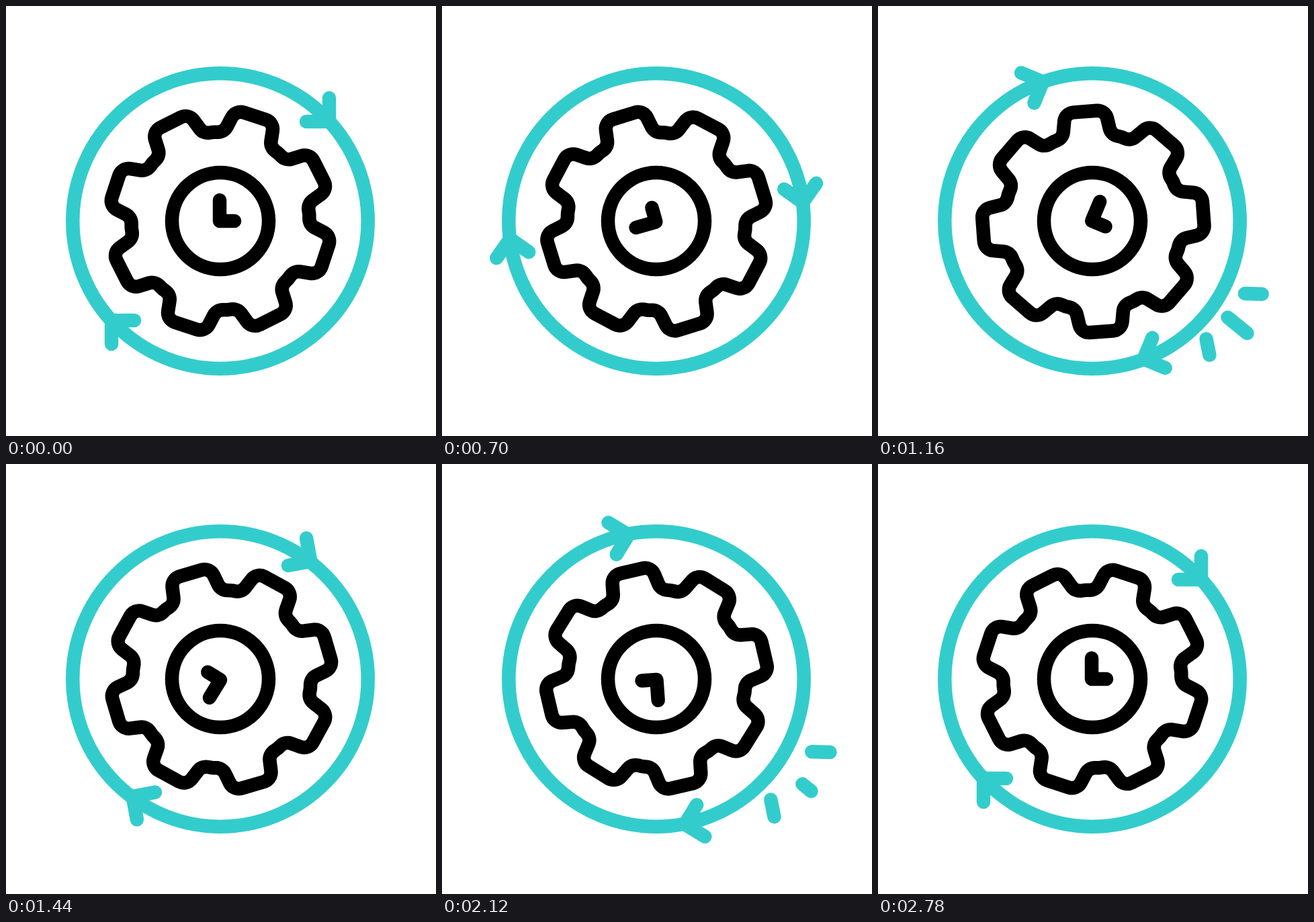
These frames come from a looping animation (640x640 px, 3260 ms). An HTML page with a canvas:

```html
<!DOCTYPE html>
<html>
<head>
<meta charset="utf-8">
<style>
  html, body { margin: 0; width: 100%; height: 100%; overflow: hidden; background: #fff; }
  canvas { display: block; }
</style>
</head>
<body>
<canvas id="stage" width="640" height="640"></canvas>
<script>
const ctx = document.getElementById('stage').getContext('2d');
const TEAL = '#33cccc', BLACK = '#000';
const LOOP = 3260, STEP = 20, START = 200, SPIN = 2580;
const TEETH = 8, GEAR_PHASE = 18.2;
const BURSTS = [996, 1875], TRIM = 160;

// Sparks: x1, y1, x2, y2, delay in ms
const SPARKS = [
  [520.5, 463.5, 549.5, 487, 0],
  [546, 428, 577.5, 429, 48],
  [488.5, 495.5, 494.5, 525, 48]
];

const ease = x => {
  x = Math.min(1, Math.max(0, x));
  return x * x * (3 - 2 * x);
};
const mix = (a, b, k) => a + (b - a) * k;

function stroke(color, path) {
  ctx.beginPath();
  path();
  ctx.strokeStyle = color;
  ctx.stroke();
}

function polyline(color, ...points) {
  stroke(color, () => points.forEach(([x, y]) => ctx.lineTo(x, y)));
}

function circle(color, r) {
  stroke(color, () => ctx.arc(319, 320, r, 0, 2 * Math.PI));
}

// Draws in stage coordinates, turned about a pivot
function rotated(degrees, x, y, draw) {
  ctx.save();
  ctx.translate(x, y);
  ctx.rotate(degrees * Math.PI / 180);
  ctx.translate(-x, -y);
  draw();
  ctx.restore();
}

// Outline corners of all teeth and valleys, rounded while tracing
const TOOTH = [[-36, -127.5], [-30, -164.3], [30, -164.3], [36, -127.5], [50.8, -122.6]];
const gearPoints = [];
for (let i = 0; i < TEETH; i++) {
  const a = (i * 360 / TEETH + GEAR_PHASE) * Math.PI / 180;
  const c = Math.cos(a), s = Math.sin(a);
  for (const [x, y] of TOOTH) gearPoints.push([319 + x * c - y * s, 320 + x * s + y * c]);
}

function gear() {
  stroke(BLACK, () => {
    const n = gearPoints.length;
    const [a, b] = [gearPoints[n - 1], gearPoints[0]];
    ctx.moveTo(mix(a[0], b[0], 0.3), mix(a[1], b[1], 0.3));
    gearPoints.forEach((p, i) => ctx.arcTo(...p, ...gearPoints[(i + 1) % n], 15));
    ctx.closePath();
  });
}

function arrows() {
  for (const side of [1, -1]) {
    polyline(TEAL, ...[[162, -183], [162, -148], [128, -148]]
      .map(([x, y]) => [319 + side * x, 320 + side * y]));
  }
}

function hands() {
  polyline(BLACK, [318, 289], [318, 320], [340, 320]);
}

function spark([x1, y1, x2, y2, delay], age) {
  const head = ease((age - delay) / TRIM);
  const tail = ease((age - delay - TRIM) / TRIM);
  if (head <= tail) return;
  polyline(TEAL,
    [mix(x1, x2, tail), mix(y1, y2, tail)],
    [mix(x1, x2, head), mix(y1, y2, head)]);
}

function render(time) {
  const t = Math.floor(time % LOOP / STEP) * STEP;
  const turn = 360 * ease((t - START) / SPIN);

  ctx.clearRect(0, 0, 640, 640);
  ctx.lineWidth = 20.5;
  ctx.lineCap = ctx.lineJoin = 'round';

  circle(TEAL, 219.7);
  rotated(turn, 320, 320, arrows);
  rotated(-turn, 320, 320, gear);
  circle(BLACK, 72);
  rotated(-3 * turn, 318.7, 320.5, hands);
  for (const start of BURSTS) SPARKS.forEach(s => spark(s, t - start));
}

const begin = performance.now();
function frame() {
  render(performance.now() - begin);
  requestAnimationFrame(frame);
}
frame();
</script>
</body>
</html>
```
